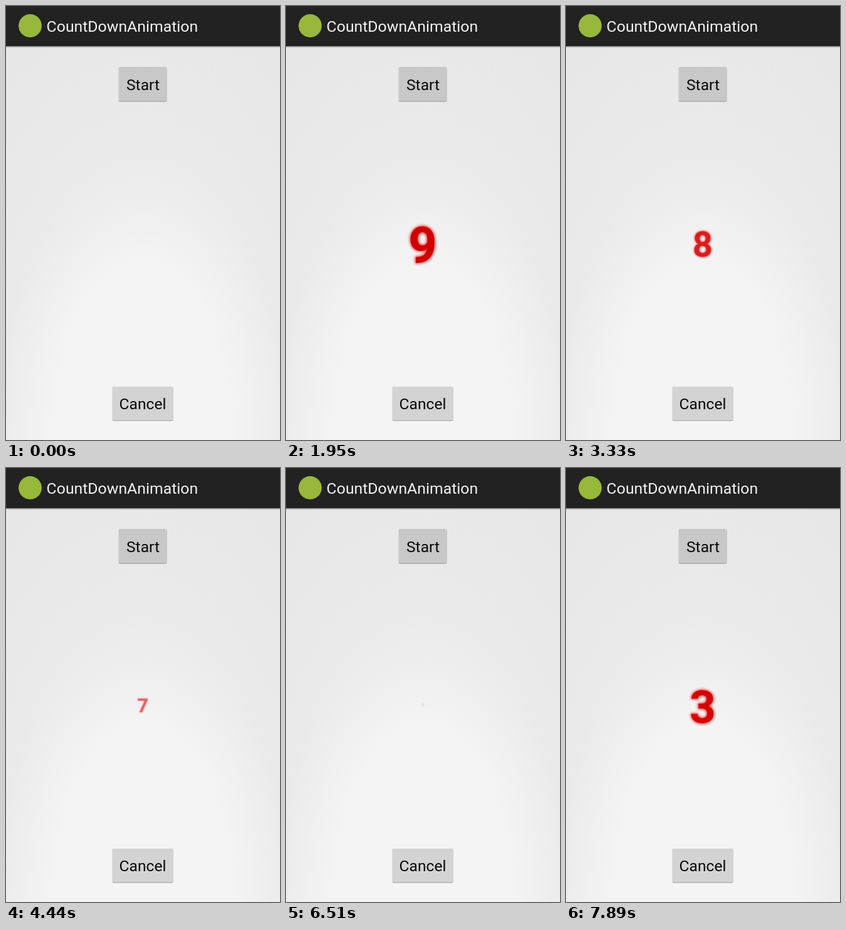
Recreate the animation shown at these times as an HTML page. Size 437x691 px, loop 8 s.

```html
<!DOCTYPE html>
<html lang="en">
<head>
<meta charset="utf-8">
<title>CountDownAnimation</title>
<style>
  html, body { margin: 0; width: 100%; height: 100%; overflow: hidden; background: #e9e9e9; }
  svg { display: block; width: 100%; height: 100%; }
  text { font-family: Roboto, "Noto Sans", sans-serif; }
  .label { font-size: 24.6px; text-anchor: middle; fill: #080808; }
  .digit { font-size: 84px; font-weight: 700; text-anchor: middle; }
  #glow { fill: #f00; stroke: #f00; stroke-width: 2px; filter: blur(2.3px); }
  #face { fill: #c00; }
</style>
</head>
<body>
<svg viewBox="0 0 437 691" preserveAspectRatio="none">
  <defs>
    <radialGradient id="backdrop" gradientUnits="userSpaceOnUse" cx="0" cy="0" r="760"
        gradientTransform="translate(218 691) scale(.52 1)">
      <stop offset=".36" stop-color="#f4f4f4"/>
      <stop offset=".6" stop-color="#eaeaea"/>
      <stop offset=".75" stop-color="#e9e9e9"/>
      <stop offset="1" stop-color="#e7e7e7"/>
    </radialGradient>
    <linearGradient id="shade" x2="0" y2="1">
      <stop stop-color="#000" stop-opacity=".35"/>
      <stop offset="1" stop-color="#000" stop-opacity="0"/>
    </linearGradient>
  </defs>
  <rect width="437" height="691" fill="url(#backdrop)"/>

  <rect width="437" height="64" fill="#222"/>
  <rect y="64" width="437" height="3" fill="url(#shade)"/>
  <circle cx="38.5" cy="31.5" r="18.5" fill="#97b83a"/>
  <text x="64.6" y="40.5" font-size="24.8" fill="#f3f3f3">CountDownAnimation</text>

  <rect id="halo" x="174" y="92" width="88" height="66" rx="4" fill="#33b5e5" fill-opacity=".4"/>
  <rect x="179.7" y="97.5" width="76.8" height="55" rx="2" fill="#a6a6a6"/>
  <rect id="start" x="180" y="97.5" width="76" height="53.5" rx="1.5" fill="#c8c8c8"/>
  <text class="label" x="218.5" y="133.5">Start</text>

  <rect x="169.7" y="606" width="96.8" height="54.7" rx="2" fill="#acacac"/>
  <rect x="170" y="606" width="96" height="53.5" rx="1.5" fill="#d3d3d3"/>
  <text class="label" x="218" y="642">Cancel</text>

  <g id="count">
    <text id="glow" class="digit" y="33.5"></text>
    <text id="face" class="digit" y="33.5"></text>
  </g>
</svg>
<script>
  const LOOP = 8000, PRESS = 810, RELEASE = 930, PERIOD = 963, FIRST = 10;

  const $ = id => document.getElementById(id);
  const count = $("count"), glow = $("glow"), face = $("face"), halo = $("halo"), start = $("start");

  // Numbers passed so far; the count lags halfway through each number and then catches up.
  function countedAt(t) {
    const beats = (t - RELEASE) / PERIOD;
    return beats + 0.1 * Math.cos(2 * Math.PI * beats);
  }

  function draw(t) {
    const pressed = t >= PRESS && t < RELEASE;
    halo.style.display = pressed ? "" : "none";
    start.setAttribute("fill", pressed ? "#a0cbd9" : "#c8c8c8");

    count.style.display = t < RELEASE ? "none" : "";
    const counted = countedAt(t), whole = Math.floor(counted);
    const size = (1 + Math.cos(Math.PI * (counted - whole))) / 2;
    count.setAttribute("transform", `translate(218 377) scale(${size})`);
    for (const part of [glow, face]) {
      part.textContent = FIRST - whole;
      part.style.opacity = size;
    }
  }

  const began = performance.now();
  function frame() {
    draw((performance.now() - began) % LOOP);
    requestAnimationFrame(frame);
  }
  frame();
</script>
</body>
</html>
```
